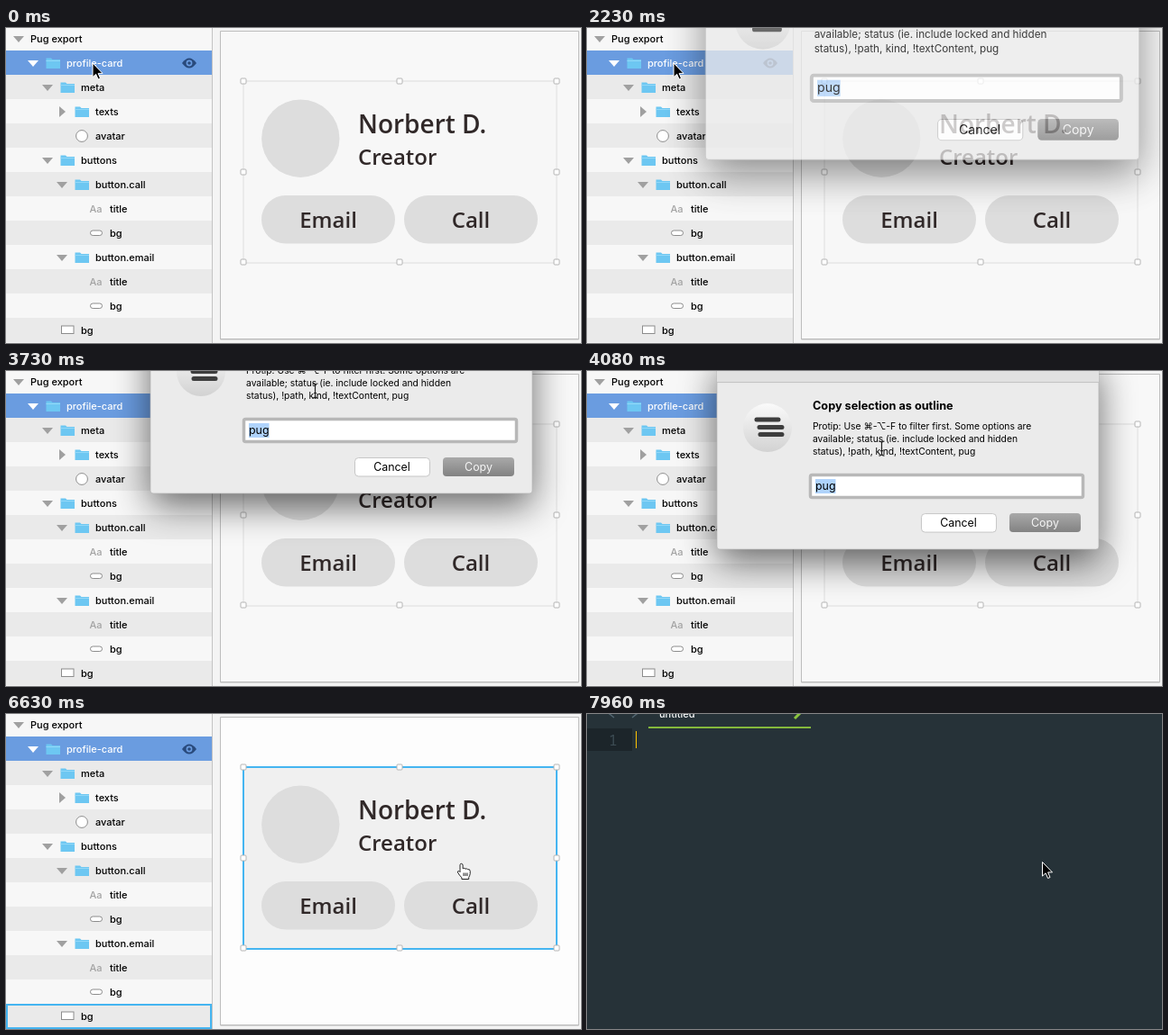
An HTML page for the animation above (8000 ms loop, 637 px wide and 350 px high).

```html
<!DOCTYPE html>
<html lang="en">
<head>
<meta charset="utf-8">
<title>Copy selection as outline</title>
<style>
html, body { margin: 0; width: 100%; height: 100%; overflow: hidden; background: #f4f4f4; }
svg { display: block; width: 637px; height: 350px; }
text { font: 500 11px Inter, "DejaVu Sans", sans-serif; }
.card text { font: 600 24px "Open Sans", sans-serif; fill: #302828; }
.card .name { font-size: 28px; }
.mid { text-anchor: middle; }
.dialog .head { font-weight: 700; font-size: 12.7px; }
.dialog .tip { font: 400 10.3px Inter, "DejaVu Sans", sans-serif; }
.dialog .ui { font: 400 12.4px Inter, sans-serif; }
.shadow { filter: blur(20px); }
.soft { filter: blur(9px); }
</style>
</head>
<body>
<svg viewBox="0 0 637 350">
  <defs>
    <linearGradient id="idle" x2="0" y2="1"><stop stop-color="#a9a9a9"/><stop offset="1" stop-color="#828282"/></linearGradient>
    <linearGradient id="down" x2="0" y2="1"><stop stop-color="#88888b"/><stop offset="1" stop-color="#49494d"/></linearGradient>
    <linearGradient id="disc" x2="0" y2="1"><stop stop-color="#fafafa"/><stop offset="1" stop-color="#d2d2d2"/></linearGradient>
  </defs>

  <g id="app">
    <rect width="637" height="350" fill="#f4f4f4"/>
    <rect x="237" y="3" width="398" height="343.5" rx="1" fill="#bdbdbd"/>
    <rect id="board" x="238" y="4" width="396" height="341" fill="#f8f8f8"/>
    <g class="card">
      <rect id="plate" x="263" y="59" width="347" height="202" fill="#f7f7f7" stroke="#dedede"/>
      <g fill="#ddd">
        <circle cx="326.3" cy="122.7" r="43.2"/>
        <rect x="283" y="186" width="148" height="53.5" rx="26.7"/>
        <rect x="441" y="186" width="148" height="53.5" rx="26.7"/>
      </g>
      <text class="name" x="390" y="117">Norbert D.</text>
      <text x="390" y="152">Creator</text>
      <text class="mid" x="357" y="221.5">Email</text>
      <text class="mid" x="515" y="221.5">Call</text>
    </g>
    <g id="handles" fill="#fff" stroke="#b4b4b4"></g>
    <g id="layers"></g>
    <rect x="228" width="1" height="350" fill="#c4c4c4"/>
    <rect id="rowHover" x="1" y="323" width="226" height="26" fill="none" stroke="#45b5f1" stroke-width="2"/>
  </g>

  <g id="runner">
    <rect class="soft" x="42" y="-30" width="660" height="114" opacity=".4"/>
    <rect x="42" y="-30" width="660" height="110" rx="5" fill="#f4f4f4"/>
    <rect id="runnerCaret" x="54" width="1" height="27" fill="#333"/>
  </g>

  <g id="dialog" class="dialog">
    <rect class="shadow" x="144" y="4" width="423" height="212" opacity=".58"/>
    <rect x="144" y="-10" width="423" height="212" rx="3" fill="#ebebeb" stroke="#b5b5b5" stroke-width=".7"/>
    <path d="M144 -10H567V16H144Z" fill="#e1e1e1"/>
    <path d="M144 16.5H567" stroke="#c2c2c2"/>
    <circle cx="200" cy="67" r="27" fill="url(#disc)"/>
    <path d="M188 58H212M191 66.5H216M192 74.5H216" stroke="#3d3d3d" stroke-width="5" stroke-linecap="round"/>
    <text class="head" x="250" y="47">Copy selection as outline</text>
    <text class="tip" x="250" y="69">Protip: Use ⌘-⌥-F to filter first. Some options are</text>
    <text class="tip" x="250" y="83">available; status (ie. include locked and hidden</text>
    <text class="tip" x="250" y="97">status), !path, kind, !textContent, pug</text>
    <rect x="247.5" y="119.5" width="302" height="25" rx="2" fill="#fff" stroke="#b8b8b8" stroke-width="3.5"/>
    <rect x="253" y="124" width="22.5" height="16" fill="#afd3fc"/>
    <text class="ui" x="253" y="136">pug</text>
    <rect x="370.5" y="162.5" width="83" height="20.5" rx="4" fill="#fff" stroke="#c6c6c6"/>
    <text class="ui mid" x="411.5" y="177">Cancel</text>
    <rect id="copy" x="468" y="162" width="79" height="21" rx="4"/>
    <text class="ui mid" x="507.5" y="177" fill="#f5f5f5">Copy</text>
  </g>

  <g id="editor">
    <rect width="637" height="350" fill="#263238"/>
    <path d="M30 -4L25 0L30 4M50 -4L55 0L50 4" fill="none" stroke="#526570" stroke-width="1.5"/>
    <text x="80" y="4" fill="#fff">untitled</text>
    <path d="M230 5L237 -2" stroke="#8bc53f" stroke-width="3"/>
    <rect x="68" y="14" width="180" height="2" fill="#84b93c"/>
    <rect y="16" width="50" height="25" fill="#1c252a"/>
    <text x="24" y="34.5" fill="#3d4c54" style="font:400 16px 'Noto Sans Mono', monospace">1</text>
    <rect id="caret" x="54" y="19" width="1" height="19" fill="#ffc400"/>
  </g>

  <g id="cursor">
    <path id="arrow" d="M0 0V15.6L3.6 12.3L6.1 18L8.5 17L6.1 11.4H11Z" fill="#000" stroke="#fff"/>
    <path id="beam" d="M-3 -8Q0 -8 0 -6Q0 -8 3 -8M0 -6V6M-3 8Q0 8 0 6Q0 8 3 8M-1.5 2.5H1.5" fill="none" stroke="#222" stroke-width="1.2"/>
    <path id="hand" d="M-1.5 9V3.2Q-1.3 1.6 .2 1.8Q1.5 2 1.6 3.6V7.3Q3.2 6.3 4.6 7.6Q6 6.9 7.2 8.2Q9.5 7.6 9.7 10V13Q9.2 15.5 8.2 17V19H.4V17.3Q-2.2 14.8 -4 11.6Q-4.4 9.8 -2.8 10Q-1.8 10.4 -1.5 11ZM2.5 12V15.5M4.5 12V15.5M6.5 12V15.5" fill="#fff" stroke="#222"/>
  </g>
</svg>

<script>
const $ = id => document.getElementById(id);
const show = (id, on) => { $(id).style.display = on ? '' : 'none'; };

// depth, label, icon, arrow state
const rows = [
  [-1.5, 'Pug export', '', 'open'],
  [1, 'profile-card', 'folder', 'open'],
  [2, 'meta', 'folder', 'open'],
  [3, 'texts', 'folder', 'shut'],
  [3, 'avatar', 'oval'],
  [2, 'buttons', 'folder', 'open'],
  [3, 'button.call', 'folder', 'open'],
  [4, 'title', 'type'],
  [4, 'bg', 'pill'],
  [3, 'button.email', 'folder', 'open'],
  [4, 'title', 'type'],
  [4, 'bg', 'pill'],
  [2, 'bg', 'box']
];
const line = 'fill="#fff" stroke="#8c8c8c"';
const icons = {
  folder: '<path d="M-22.5 -5.5h5.5l1.5 1.5h8.5v10h-15.5z" fill="#6dc7f2"/><path d="M-22.5 -2.5h15.5" stroke="#93d8f8"/>',
  oval: `<circle cx="-15" r="6.4" ${line}/>`,
  type: '<text x="-22.5" y="4" fill="#a2a2a2">Aa</text>',
  pill: `<rect x="-21.5" y="-3" width="13" height="5.5" rx="2.7" ${line}/>`,
  box: `<rect x="-21.5" y="-5" width="13.5" height="8.5" ${line}/>`
};
const arrows = { open: 'M-6 -3H6L0 4Z', shut: 'M-3 -6V6L4 0Z' };

$('layers').innerHTML = rows.map(([depth, label, icon, arrow], i) => {
  const picked = i === 1, x = i ? 51 + 16 * depth : 27;
  const fill = picked ? '#6a9ce0' : i && i % 2 === 0 ? '#eaeaea' : '#f7f7f7';
  const twist = arrow ? `<path transform="translate(${i ? -37 : -13})" d="${arrows[arrow]}" fill="${picked ? '#fff' : '#a0a0a0'}"/>` : '';
  return `<rect y="${27 * i - 2}" width="228" height="27" fill="${fill}"/>
    <g transform="translate(${x} ${27 * i + 12})">${twist}${icons[icon] || ''}
    <text y="4" fill="${picked ? '#fff' : '#000'}">${label}</text></g>`;
}).join('') +
  '<path d="M195 39Q203 28 211 39Q203 50 195 39Z" fill="#294a7c"/><circle cx="203" cy="39" r="3.4" fill="#6a9ce0"/><circle cx="203" cy="39" r="1.8" fill="#294a7c"/>';

for (const x of [263, 436, 610]) for (const y of [59, 160, 260])
  if (x !== 436 || y !== 160)
    $('handles').innerHTML += `<rect x="${x - 3}" y="${y - 3}" width="6" height="6" rx="1"/>`;

// Eased position along [time, x, y] keys
function along(keys, t) {
  const n = keys.findIndex(k => k[0] > t);
  if (n < 0) return keys[keys.length - 1].slice(1);
  if (n === 0) return keys[0].slice(1);
  const [a, b] = [keys[n - 1], keys[n]];
  const u = (t - a[0]) / (b[0] - a[0]), e = u * u * (3 - 2 * u);
  return [a[1] + (b[1] - a[1]) * e, a[2] + (b[2] - a[2]) * e];
}
const drag = [[3720, 16, -66], [4070, 0, -4], [4160, -3, 4], [4250, 0, 0]];
const reach = [[2760, 96, 39], [3640, 342.5, 22]];
const press = [[4250, 326.5, 90], [4510, 397, 154], [4780, 440, 168], [5040, 508, 171], [5220, 516, 165]];
const leave = [[5580, 516, 165], [6110, 504.5, 164.5]];

function draw(t) {
  const q = Math.floor(t / 88.6 + .1) * 88.6;
  const hover = t >= 6280;

  $('board').setAttribute('fill', hover ? '#fdfdfd' : '#f8f8f8');
  const plate = $('plate');
  plate.setAttribute('fill', hover ? '#f0f0f0' : '#f7f7f7');
  plate.setAttribute('stroke', hover ? '#45b5f1' : '#dedede');
  plate.setAttribute('stroke-width', hover ? 2 : 1);
  show('rowHover', hover);

  show('runner', t >= 440 && t < 1960);
  show('runnerCaret', t < 980 || t >= 1520);

  show('dialog', t >= 1960 && t < 5490);
  const [dx, dy] = along(drag, q);
  const p = Math.min(1, Math.max(0, (q - 1956) / 440));
  const s = 1.33 - .33 * p;
  $('dialog').setAttribute('transform', `translate(371.5 60) scale(${s}) translate(${dx - 371.5} ${dy - 60})`);
  $('dialog').setAttribute('opacity', Math.min(1, .2 + .95 * p));
  $('copy').setAttribute('fill', t >= 5230 ? 'url(#down)' : 'url(#idle)');

  show('editor', t >= 7610);
  show('caret', t >= 7960);

  const pos = q < 3700 ? along(reach, q)
    : q < 4250 ? [dx + 326.5, dy + 90 - 2 * (dy < -60)]
    : q < 5500 ? along(press, q) : along(leave, q);
  const beam = t >= 3650 && t < 4250, hand = t >= 6630 && t < 7790;
  $('cursor').setAttribute('transform', `translate(${pos})`);
  show('beam', beam);
  show('hand', hand);
  show('arrow', !beam && !hand);
}

const start = performance.now();
function tick() {
  draw((performance.now() - start) % 8000);
  requestAnimationFrame(tick);
}
tick();
</script>
</body>
</html>
```
